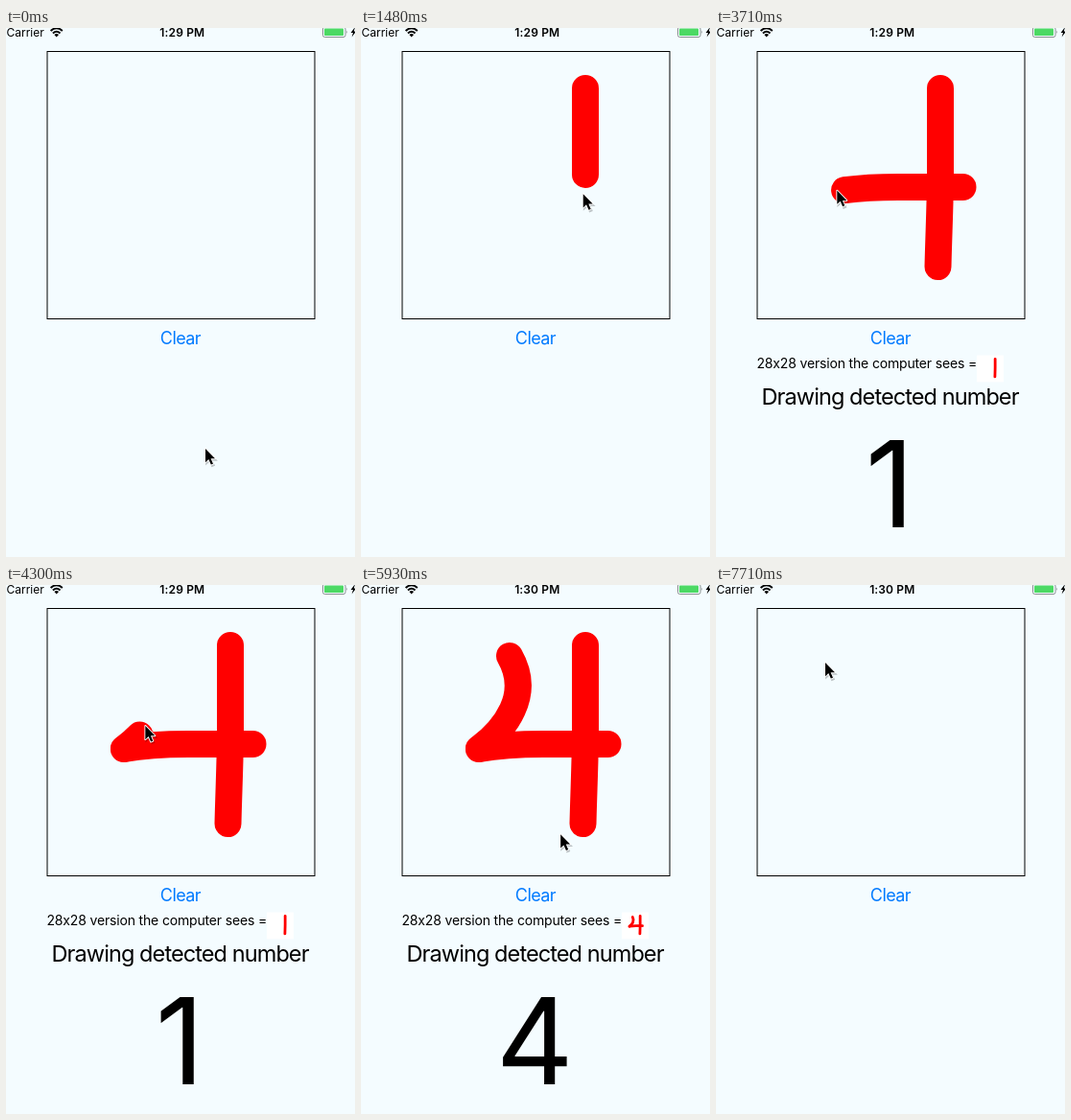
An HTML page for the animation above (8 s loop, 364 px wide and 552 px high).

```html
<!DOCTYPE html>
<html lang="en">
<head>
<meta charset="utf-8">
<title>Digit drawing</title>
<style>
  html, body { margin: 0; width: 100%; height: 100%; overflow: hidden; background: #f4fcff; }
  svg { display: block; width: 100%; height: 100%; }
  text { font-family: Inter, Roboto, "Liberation Sans", sans-serif; }
  .mid { text-anchor: middle; }
  .ink { fill: none; stroke: #f00; stroke-width: 28; stroke-linecap: round; stroke-linejoin: round; }
</style>
</head>
<body>
<svg viewBox="0 0 364 552">
  <rect width="364" height="552" fill="#f4fcff"/>

  <g id="status">
    <text x="0.5" y="9" font-size="12">Carrier</text>
    <g fill="none" stroke="#000" stroke-width="2">
      <path d="M46.6 2.9Q52.7 -2.4 58.8 2.9"/>
      <path d="M48.9 5.4Q52.7 2 56.5 5.4"/>
    </g>
    <path d="M50.4 7Q52.7 5.2 55 7L52.7 9.4Z"/>
    <text id="clock" class="mid" x="183.8" y="9" font-size="12" font-weight="600" letter-spacing=".15"></text>
    <rect x="330.5" y="-1" width="23.5" height="10.5" rx="2" fill="none" stroke="#8b9093"/>
    <rect x="332" y="0.5" width="20" height="7.5" rx=".8" fill="#4cd964"/>
    <path d="M355.2 2.5q1.6 1.7 0 3.6z" fill="#8b9093"/>
    <path d="M364 -1L359.6 5H362L360.6 9.5L365 3.6H362.8Z"/>
  </g>

  <rect x="43" y="24.5" width="279" height="279" fill="none" stroke="#000"/>
  <g class="ink">
    <path id="stem" pathLength="1" d="M234 63V150C234 180 232.3 215 231.5 249"/>
    <path id="bar" pathLength="1" d="M257.5 166H190Q150 166 123 171"/>
    <path id="hook" pathLength="1" d="M123 171Q148 152 158 130Q171 102 155 74"/>
  </g>

  <text id="clear" class="mid" x="181.9" y="330" font-size="18" letter-spacing="-.6" fill="#007aff">Clear</text>

  <g id="result">
    <text x="42.5" y="355" font-size="14" letter-spacing="-.165">28x28 version the computer sees =</text>
    <rect x="272" y="341.5" width="28" height="28" fill="#fff"/>
    <g class="ink" transform="translate(272 341.5) scale(.1) translate(-42.5 -24.5)">
      <use href="#stem"/>
      <g id="miniFour"><use href="#bar"/><use href="#hook"/></g>
    </g>
    <text class="mid" x="181.6" y="393" font-size="23.5" letter-spacing="-.91">Drawing detected number</text>
    <text id="digit" class="mid" x="181.2" y="520.5" font-size="125.5"></text>
  </g>

  <g id="cursor">
    <path d="M0 0V14.5L3.4 11.4L6 17L8.4 16L5.9 10.6H10.4Z" transform="translate(.8 1.4)" opacity=".22" stroke="#000" stroke-width="1.4"/>
    <path d="M0 0V14.2L3.3 11.1L5.8 16.6L8 15.7L5.6 10.3H10Z" stroke="#fff" stroke-width="1.8" stroke-linejoin="round" paint-order="stroke"/>
  </g>
</svg>

<script>
  const LOOP = 8000, STEPS = 54;   // the screen refreshes 54 times per loop
  const ONE = 15, FOUR = 33, CLEARED = 44, MINUTE = 30;
  const INK_LAG = .45;             // ink trails the pointer by this many steps

  const $ = id => document.getElementById(id);
  const clamp = v => Math.min(1, Math.max(0, v));
  const linear = u => u;
  const easeOut = u => 1 - (1 - u) ** 2;
  const easeInOut = u => u * u * (3 - 2 * u);

  function glide(d, from, to, ease) {
    const path = document.createElementNS("http://www.w3.org/2000/svg", "path");
    path.setAttribute("d", d);
    return { path, from, to, ease };
  }

  function stroke(id, from, to, ease) {
    return { path: $(id), from, to, ease, pen: true };
  }

  const moves = [
    glide("M208 439Q224 300 227 146", 0, 2, linear),
    glide("M227 146L231 61", 3, 6, linear),
    stroke("stem", 8, 13.5, easeOut),
    glide("M230 249Q248 210 255 166", 18, 21, easeOut),
    stroke("bar", 21, 26, easeOut),
    stroke("hook", 27, 32.5, easeInOut),
    glide("M153 73C200 130 237 270 181 323", 36, 42, easeInOut),
    glide("M181 323C178 190 205 90 114 72", 45, 51, linear),
    glide("M114 72V81", 51, 52, linear)
  ];

  const progress = (move, step) => move.ease(clamp((step - move.from) / (move.to - move.from)));

  function show(el, on) {
    el.style.display = on ? "" : "none";
  }

  function drawPointer(step) {
    const move = moves.filter(m => m.from <= step).pop();
    const { x, y } = move.path.getPointAtLength(progress(move, step) * move.path.getTotalLength());
    const [dx, dy] = move.pen ? [-2, -.5] : [0, 0];
    $("cursor").setAttribute("transform", `translate(${x + dx} ${y + dy})`);
  }

  function drawInk(move, step) {
    const visible = step >= move.from && step < CLEARED;
    move.path.setAttribute("visibility", visible ? "visible" : "hidden");
    move.path.setAttribute("stroke-dasharray", `${progress(move, step - INK_LAG)} 2`);
  }

  function draw(time) {
    const step = Math.floor(time % LOOP / LOOP * STEPS + .04) % STEPS;
    drawPointer(step);
    moves.filter(m => m.pen).forEach(m => drawInk(m, step));
    show($("result"), step >= ONE && step < CLEARED);
    show($("miniFour"), step >= FOUR);
    $("digit").textContent = step < FOUR ? "1" : "4";
    $("clock").textContent = step < MINUTE ? "1:29 PM" : "1:30 PM";
    $("clear").setAttribute("opacity", step < CLEARED ? 1 : clamp(.22 + (step - CLEARED) / 3));
  }

  const start = performance.now();
  function tick() {
    draw(performance.now() - start);
    requestAnimationFrame(tick);
  }
  tick();
</script>
</body>
</html>
```
